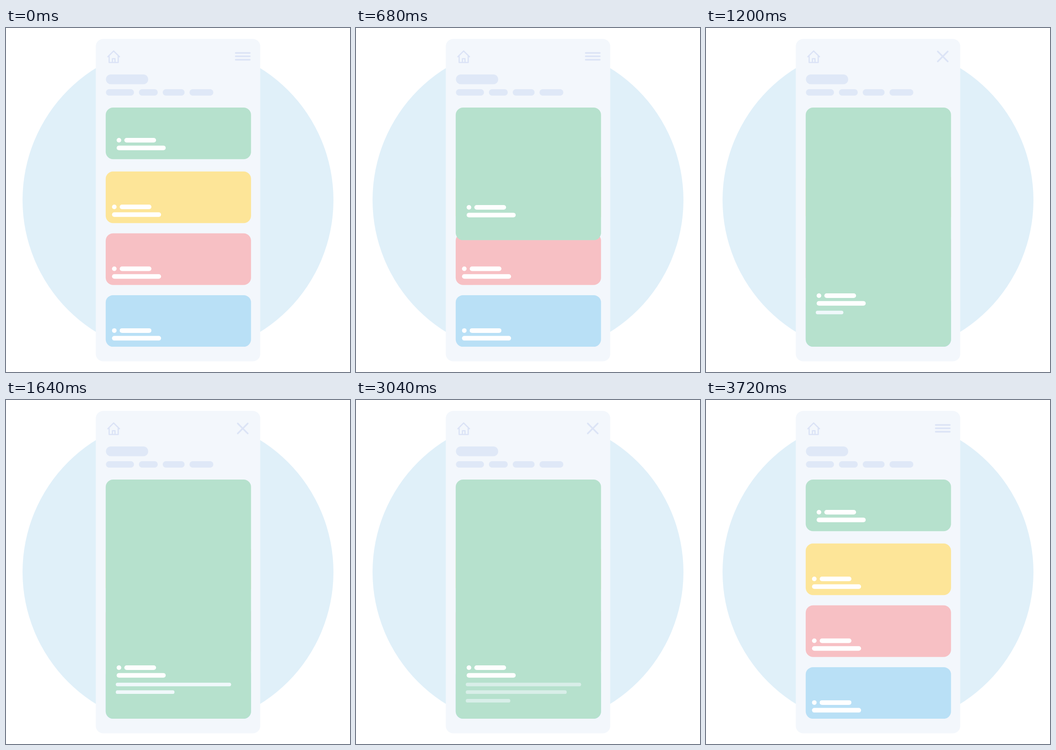
An HTML page that plays this animation: 748 by 748 pixels, repeating every 4280 ms.

```html
<!DOCTYPE html>
<html>
<head>
<meta charset="utf-8">
<style>
html, body { margin: 0; width: 100%; height: 100%; overflow: hidden; background: #fff; }
svg { display: block; width: 100vw; height: 100vh; }
</style>
</head>
<body>
<svg viewBox="0 0 748 748">
  <defs>
    <g id="label" fill="#fff">
      <circle r="5"/>
      <rect x="11.7" y="-5" width="69" height="10" rx="5"/>
      <rect x="-5" y="11.7" width="106.7" height="10" rx="5"/>
    </g>
  </defs>
  <circle cx="374" cy="374" r="338" fill="#e0f0f9"/>
  <rect x="195.3" y="23.8" width="357.5" height="701" rx="16" fill="#f3f7fc"/>
  <g fill="none" stroke="#dbe3f6" stroke-width="2.6" stroke-linecap="round" stroke-linejoin="round">
    <path d="M221.5 62.5L234 50L246.700 62.500M224.300 61V75H244V61M231.300 75V66.700H237V75"/>
  </g>
  <g fill="#dfe8f7">
    <rect x="217.300" y="101" width="92" height="21.300" rx="10.600"/>
    <rect x="217.300" y="133" width="61" height="14" rx="7"/>
    <rect x="289" y="133" width="41" height="14" rx="7"/>
    <rect x="340.800" y="133" width="47.600" height="14" rx="7"/>
    <rect x="399" y="133" width="51.800" height="14" rx="7"/>
  </g>
  <g id="menu" stroke="#dce4f6" stroke-width="3.500" stroke-linecap="round">
    <path d="M-15.300 0H15.300"/>
    <path d="M-15.300 0H15.300"/>
    <path d="M-15.300 0H15.300"/>
  </g>
  <g id="cards"></g>
  <rect id="sheet" x="216.800" y="173" width="316" rx="16" fill="#b6e1cd"/>
  <use id="title" href="#label"/>
  <g id="lines" fill="#f0f8fb">
    <rect x="238.700" y="614.700" height="7.800" rx="3.900"/>
    <rect x="238.700" y="631.300" height="7.800" rx="3.900"/>
    <rect x="238.700" y="650" height="7.800" rx="3.900"/>
  </g>
</svg>
<script>
const $ = id => document.getElementById(id);
const LOOP = 4280, STEP = 40;

$('cards').innerHTML = [[312, '#fde598'], [446.5, '#f7c0c4'], [580.9, '#b9e0f6']].map(([y, fill]) =>
  `<rect x="216.800" y="${y}" width="316" height="112.200" rx="16" fill="${fill}"/>
   <use href="#label" x="235.500" y="${y + 77}"/>`).join('');

const [top_, middle, bottom] = $('menu').children;
const lines = [...$('lines').children];

// Smooth progress from 0 to 1
function ease(t, start, dur) {
  const x = Math.min(1, Math.max(0, (t - start) / dur));
  return x * x * (3 - 2 * x);
}

function place(el, x, y, angle = 0) {
  el.setAttribute('transform', `translate(${x} ${y}) rotate(${angle})`);
}

function draw(t) {
  const open = ease(t, 480, 440);
  const height = open - ease(t, 3276, 440);
  const rise = open - ease(t, 3254, 440);
  $('sheet').setAttribute('height', 112.2 + 407.8 * height);
  place($('title'), 245.6, 244 + 338 * rise);

  const cross = ease(t, 840, 280) - ease(t, 3240, 440);
  place(top_, 514.8, 54.3 + 7.6 * cross, 45 * cross);
  place(bottom, 514.8, 69.1 - 7.2 * cross, -45 * cross);
  place(middle, 514.8 - 46 * cross, 61.6);
  middle.setAttribute('opacity', 1 - cross);

  [250.8, 219.5, 96.8].forEach((w, i) =>
    lines[i].setAttribute('width', w * ease(t, 1060 + 336 * i, 440)));
  const fade = t < 3040 ? 1 : t < 3160 ? 0.6 : Math.max(0, 0.3 - (t - 3160) / 267);
  $('lines').setAttribute('opacity', fade);
}

function tick() {
  draw(Math.floor(performance.now() % LOOP / STEP) * STEP);
  requestAnimationFrame(tick);
}
tick();
</script>
</body>
</html>
```
